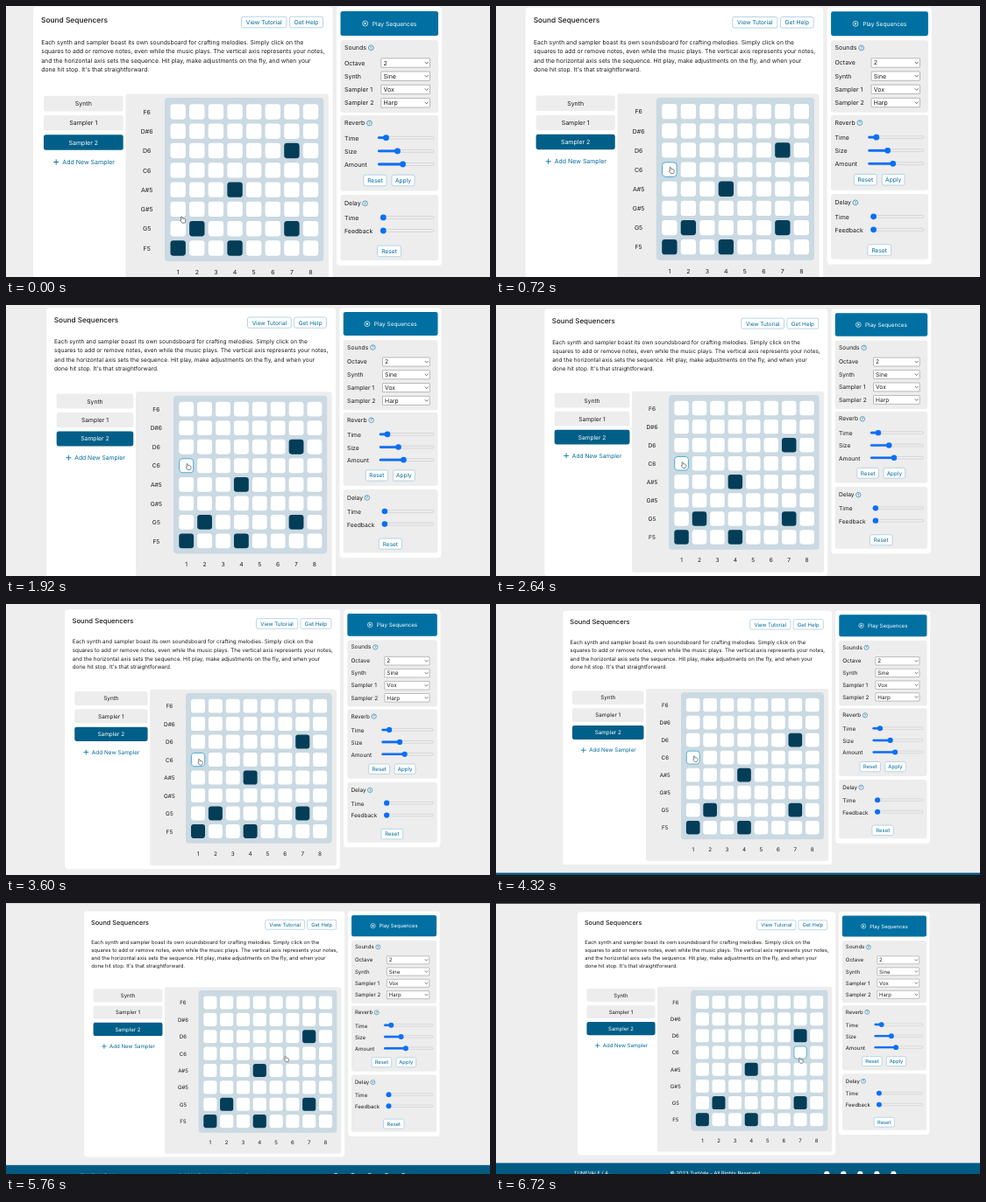
An HTML page that plays this animation: 552 px wide and 310 px high, repeating every 6800 ms.

```html
<!DOCTYPE html>
<html lang="en">
<head>
<meta charset="utf-8">
<title>Sound Sequencers</title>
<style>
  html, body { margin: 0; height: 100%; overflow: hidden; background: #eee; }
  svg { display: block; width: 100vw; height: 100vh; }
  text { font: 7px Inter, "Liberation Sans", sans-serif; fill: #1c1c1c; text-rendering: geometricPrecision; }
  .mid { text-anchor: middle; }
  .title { font-size: 8.4px; font-weight: 500; }
  .body { font-size: 6.82px; }
  .small { font-size: 6.7px; }
  .link { fill: #006a9b; }
  .light { fill: #fff; }
  .mark { font-size: 4.8px; fill: #0070a2; }
  .line { fill: none; stroke-linecap: round; stroke-linejoin: round; }
</style>
</head>
<body>
<svg viewBox="0 0 552 310"><g id="page"></g></svg>
<script>
const LOOP = 6800, STEP = 80;
const PIVOT = { x: 478, y: 67 };
const BLUE = '#0070a2', DEEP = '#005f88', NAVY = '#033d58', GREY = '#ededed', ACCENT = '#0a6ff8';
const page = document.getElementById('page');

function add(tag, attrs, content) {
  const el = document.createElementNS('http://www.w3.org/2000/svg', tag);
  for (const name in attrs) el.setAttribute(name, attrs[name]);
  if (content) el.textContent = content;
  return page.appendChild(el);
}
const box = (x, y, right, bottom, fill, rx = 0, more = {}) =>
  add('rect', { x, y, width: right - x, height: bottom - y, fill, rx, ...more });
const dot = (cx, cy, r, fill, more = {}) => add('circle', { cx, cy, r, fill, ...more });
const stroke = (d, color, width) =>
  add('path', { d, class: 'line', stroke: color, 'stroke-width': width });
// y is the middle of the capitals
const label = (str, x, y, cls = '') => add('text', { x, y: y + 2.5, class: cls }, str);

function outlineButton(str, cx, cy, width) {
  box(cx - width / 2, cy - 6.3, cx + width / 2, cy + 6.3, '#fff', 2,
    { stroke: '#adcee0', 'stroke-width': .9 });
  label(str, cx, cy, 'mid small link');
}

function help(x, y) {
  dot(x, y, 2.9, 'none', { stroke: BLUE, 'stroke-width': .6 });
  add('text', { x, y: y + 1.75, class: 'mid mark' }, '?');
}

function select(name, value, y) {
  label(name, 386, y);
  box(427.8, y - 5.2, 483.5, y + 5.2, '#fff', .6, { stroke: '#777', 'stroke-width': .5 });
  label(value, 430.5, y);
  stroke(`M478 ${y - .8}l1.7 1.8 1.7-1.8`, '#333', .7);
}

function slider(name, y, knob, left = 424) {
  label(name, 386, y);
  const ty = y - .6;
  box(left, ty - 1.4, 488, ty + 1.4, '#efefef', 1.4, { stroke: '#bbb', 'stroke-width': .5 });
  box(left, ty - 1.4, knob, ty + 1.4, ACCENT, 1.4);
  dot(knob, ty, 3.4, ACCENT);
}

// Page frame
box(-600, -100, 1100, -9.9, '#1d1f21');
box(31, 1, 372.5, 324, '#fff', 4);
box(377, 1, 497, 297, '#fff', 4);

// Intro
label('Sound Sequencers', 40, 16, 'title');
outlineButton('View Tutorial', 294.2, 18.5, 51.5);
outlineButton('Get Help', 342.5, 18.5, 38);
[
  'Each synth and sampler boast its own soundsboard for crafting melodies. Simply click on the',
  'squares to add or remove notes, even while the music plays. The vertical axis represents your notes,',
  'and the horizontal axis sets the sequence. Hit play, make adjustments on the fly, and when your',
  "done hit stop. It's that straightforward."
].forEach((str, i) => label(str, 40.3, 41 + 10.5 * i, 'body'));

// Instruments
['Synth', 'Sampler 1', 'Sampler 2'].forEach((str, i) => {
  const y = 111.6 + 22.2 * i, on = i === 2;
  box(43, y - 8.8, 133.7, y + 8.8, on ? DEEP : GREY, 2.5);
  label(str, 88.3, y, on ? 'mid light' : 'mid');
});
stroke('M54.5 178.5h5.4M57.2 175.8v5.4', BLUE, .9);
label('Add New Sampler', 64.3, 178.5, 'link');

// Note grid
const colX = c => 196.2 + 21.62 * c;
const rowY = r => 121 + 22.28 * r;
const HALF = 8.7, INSET = 8.3;
const cell = (c, r, half, fill, more) =>
  box(colX(c) - half, rowY(r) - half, colX(c) + half, rowY(r) + half, fill, 3.4, more);
const notes = new Set(['6,2', '3,4', '1,6', '6,6', '0,7', '3,7']);

box(136.5, 100.5, 368, 319.6, GREY, 3);
box(181, 105, 362.3, 292, '#cad9e2', 4);
['F6', 'D#6', 'D6', 'C6', 'A#5', 'G#5', 'G5', 'F5'].forEach((note, r) => {
  label(note, 160.7, rowY(r) + .3, 'mid');
  label(String(r + 1), colX(r), 304.5, 'mid');
  for (let c = 0; c < 8; c++) cell(c, r, HALF, notes.has(`${c},${r}`) ? NAVY : '#fff');
});
const hover = cell(0, 0, INSET, '#fff', { stroke: '#3ba3cf', 'stroke-width': 1 });

// Controls
box(381.5, 6, 493, 34, BLUE, 2.5);
dot(409.6, 20, 3, 'none', { stroke: '#fff', 'stroke-width': .7 });
add('path', { d: 'M408.7 18.4v3.2l2.6-1.6z', fill: '#fff' });
label('Play Sequences', 417.8, 20, 'small light');

box(381.5, 39, 493, 122, GREY, 3);
label('Sounds', 386, 47.5);
help(416.3, 47.8);
select('Octave', '2', 65);
select('Synth', 'Sine', 80.2);
select('Sampler 1', 'Vox', 95.5);
select('Sampler 2', 'Harp', 110.8);

box(381.5, 125, 493, 211.5, GREY, 3);
label('Reverb', 386, 133.7);
help(414.5, 134);
slider('Time', 151.3, 433.5);
slider('Size', 166.5, 446.5);
slider('Amount', 181.6, 452.6);
outlineButton('Reset', 421, 199.5, 26);
outlineButton('Apply', 453, 199.5, 26);

box(381.5, 216, 493, 291, GREY, 3);
label('Delay', 386, 225.5);
help(409.5, 225.8);
slider('Time', 242.5, 430.3, 427.2);
slider('Feedback', 257.6, 430.3, 427.2);
outlineButton('Reset', 437, 280.4, 27);

// Footer
box(-600, 334.6, 1100, 420, '#005b82');
label('TUNEVALE / A', 26, 348.3, 'small light');
label('© 2023 TunVale - All Rights Reserved', 213, 348.3, 'mid small light');
for (let i = 0; i < 5; i++) dot(361 + 22.1 * i, 349, 3.6, '#fff');

// Pointing hand, fingertip at the origin
const hand = add('path', {
  d: 'M-.8 .5q.8-1.1 1.6 0l.6 2.2 2.2.1q1.5.5 1.6 1.9l-.2 2.2-.8 1.5H.9L-1.5 5.3q0-1 1.2-.6z',
  fill: '#fff', stroke: '#222', 'stroke-width': .65, 'stroke-linejoin': 'round'
});

// Motion keys: [ms, value]
const zoom = [[0, 1], [720, .994], [1920, .9663], [2640, .9455], [3600, .919], [4960, .884], [6720, .861]];
const handX = [[0, 200.2], [600, 197], [3600, 197.4], [4640, 197.5], [4960, 210], [6240, 325]];
const handY = [[0, 240.8], [600, 185], [1920, 185.4], [3600, 187], [4640, 185], [4960, 184.2], [6240, 194.7]];

// Monotone cubic through the keys, at rest on both ends
function curve(keys, t) {
  const last = keys.length - 1;
  if (t >= keys[last][0]) return keys[last][1];
  const slope = i => (keys[i + 1][1] - keys[i][1]) / (keys[i + 1][0] - keys[i][0]);
  const tangent = i => {
    if (i === 0 || i === last) return 0;
    const a = slope(i - 1), b = slope(i);
    return a * b > 0 ? 2 * a * b / (a + b) : 0;
  };
  const i = keys.findIndex((k, n) => t < keys[n + 1][0]);
  const [t0, v0] = keys[i], [t1, v1] = keys[i + 1];
  const d = t1 - t0, u = (t - t0) / d, w = 1 - u;
  return v0 * (1 + 2 * u) * w * w + v1 * (3 - 2 * u) * u * u
    + d * u * w * (tangent(i) * w - tangent(i + 1) * u);
}

function draw(t) {
  const s = curve(zoom, t), x = curve(handX, t), y = curve(handY, t);
  page.setAttribute('transform',
    `translate(${PIVOT.x * (1 - s)} ${PIVOT.y * (1 - s)}) scale(${s})`);
  hand.setAttribute('transform', `translate(${x} ${y}) scale(.88)`);

  const c = Math.round((x - colX(0)) / 21.62), r = Math.round((y - rowY(0)) / 22.28);
  const inside = Math.max(Math.abs(x - colX(c)), Math.abs(y - rowY(r))) < 7.3;
  hover.setAttribute('visibility', inside ? 'visible' : 'hidden');
  hover.setAttribute('x', colX(c) - INSET);
  hover.setAttribute('y', rowY(r) - INSET);
}

const start = performance.now();
function tick() {
  const t = (performance.now() - start) % LOOP;
  draw(Math.floor(t / STEP) * STEP);
  requestAnimationFrame(tick);
}
tick();
</script>
</body>
</html>
```
